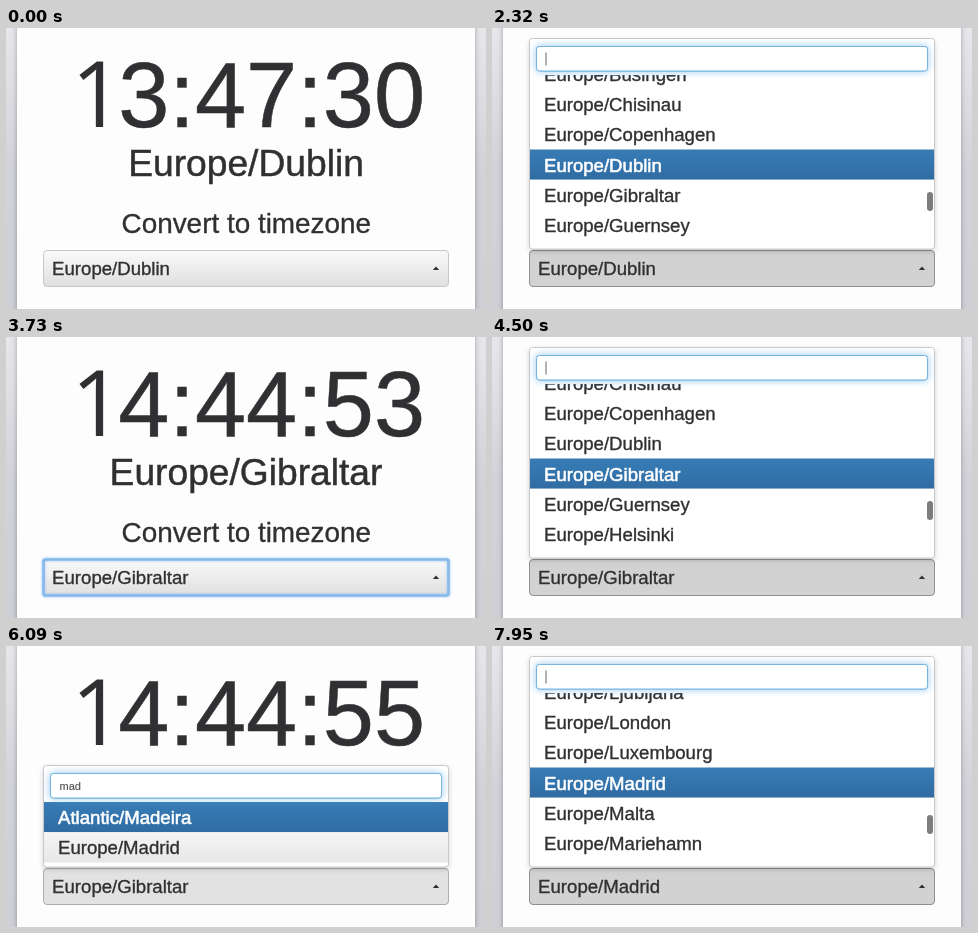
Write an HTML page with a canvas that moves like this. It is 480x281 px and loops after 8 s.

```html
<!DOCTYPE html>
<html lang="en">
<head>
<meta charset="utf-8">
<title>Timezone clock</title>
<style>
html, body { margin: 0; width: 100%; height: 100%; overflow: hidden; background: #fff; }
canvas { display: block; width: 480px; height: 281px; }
</style>
</head>
<body>
<canvas width="480" height="281"></canvas>
<script>
const ctx = document.querySelector('canvas').getContext('2d');
const LOOP = 8000, ROW = 30.25, INK = '#303033';
const SANS = '"Liberation Sans", Arial, sans-serif';

const zones = {
  Dublin: ['Busingen', 'Chisinau', 'Copenhagen', 'Dublin', 'Gibraltar', 'Guernsey', 'Helsinki'],
  Gibraltar: ['Chisinau', 'Copenhagen', 'Dublin', 'Gibraltar', 'Guernsey', 'Helsinki', 'Isle_of_Man'],
  Madrid: ['Ljubljana', 'London', 'Luxembourg', 'Madrid', 'Malta', 'Mariehamn', 'Minsk']
};
const matches = {
  m: ['Africa/Asmara', 'Africa/Bamako', 'Africa/Bujumbura', 'Africa/Dar_es_Salaam', 'Africa/Khartoum', 'Africa/Lome'],
  ma: ['Africa/Asmara', 'Africa/Bamako', 'Africa/Maputo', 'Africa/Maseru', 'America/Managua', 'America/Manaus'],
  mad: ['Atlantic/Madeira', 'Europe/Madrid']
};

// Last value whose start time has passed
const at = (t, steps) => steps.filter(s => s[0] <= t).pop()[1];

// The thin outline gives the text a slightly stronger weight
function text(str, x, y, size, { color = INK, align = 'left', weight = .35, family = SANS } = {}) {
  ctx.font = `${size}px ${family}`;
  ctx.textAlign = align;
  ctx.fillStyle = ctx.strokeStyle = color;
  ctx.lineWidth = weight;
  ctx.lineJoin = 'round';
  ctx.fillText(str, x, y);
  if (weight) ctx.strokeText(str, x, y);
}

function box(x, y, w, h, r, fill, stroke, line = 1) {
  ctx.beginPath();
  ctx.roundRect(x, y, w, h, r);
  if (fill) { ctx.fillStyle = fill; ctx.fill(); }
  if (stroke) { ctx.strokeStyle = stroke; ctx.lineWidth = line; ctx.stroke(); }
}

function shade(y0, y1, ...colors) {
  const g = ctx.createLinearGradient(0, y0, 0, y1);
  colors.forEach((c, i) => g.addColorStop(i / (colors.length - 1), c));
  return g;
}

function shadow(color, blur, dy, draw) {
  ctx.save();
  ctx.shadowColor = color;
  ctx.shadowBlur = blur;
  ctx.shadowOffsetY = dy;
  draw();
  ctx.restore();
}

function clock(t) {
  const [base, sec] = t < 3550 ? ['13:47:', 30 + Math.floor((t + 550) / 1000)]
    : ['14:44:', 53 + Math.floor((t - (t < 6410 ? 3550 : 6410)) / 1000)];
  const size = 92;
  let x = 61;
  for (const ch of base + sec) {
    // A one without a foot
    if (ch === '1') text(ch, x + 4, 99, size, { family: '"Open Sans", sans-serif', weight: 0 });
    else text(ch, x, 99, size, { weight: .5 });
    x += size * (ch === ':' ? .278 : .556);
  }
}

function page(t, zone) {
  ctx.fillStyle = shade(0, 281, '#e7e7eb', '#d2d2d9', '#cfcfd6');
  ctx.fillRect(0, 0, 480, 281);
  shadow('rgba(0,0,0,.3)', 5, 0, () => box(11, -20, 458, 330, 0, '#fefdfe'));
  clock(t);
  text('Europe/' + zone, 240, 148, 37.2, { align: 'center', weight: .5 });
  text('Convert to timezone', 240.3, 205, 27.9, { align: 'center' });
}

function button(zone, state) {
  const looks = {
    normal: [shade(222, 259, '#fafafa', '#dfdfdf'), '#c8c8c8'],
    hover: [shade(222, 259, '#f1f1f1', '#e0e0e0', '#e0e0e0'), '#adadad'],
    open: ['#e2e2e2', '#adadad'],
    pressed: ['#d2d2d2', '#8f8f8f']
  };
  const [look, ring] = state;
  box(37.5, 222.5, 405, 36, 3.5, ...looks[look]);
  if (ring) shadow('#8fc0f0', 3, 0, () => box(37.5, 222.5, 405, 36, 2, null, '#86b9ea', 2.5));
  text('Europe/' + zone, 46.1, 247, 18.6);
  ctx.beginPath();
  ctx.moveTo(426.8, 242);
  ctx.lineTo(433.2, 242);
  ctx.lineTo(430, 238.6);
  ctx.fill();
}

function menu(t, zone, opened, query, hover) {
  const found = matches[query];
  const rows = found || zones[zone].map(z => 'Europe/' + z);
  const top = query === 'mad' ? 120 : 11;
  const first = found ? top + 36 : 121.5 - 3 * ROW;
  const active = found ? 0 : 3;

  shadow('rgba(0,0,0,.2)', 5, 2, () => box(37.5, top - .5, 405, 221.5 - top, 3, '#fff'));
  box(37.5, top - .5, 405, 221.5 - top, 3, '#fff', '#c9c9c9');

  ctx.save();
  ctx.beginPath();
  ctx.rect(38, top + 36, 404, 181 - top);
  ctx.clip();
  rows.forEach((name, i) => {
    const y = first + i * ROW, on = i === active;
    if (on) ctx.fillStyle = shade(y, y + ROW, '#387cb6', '#2f6ca2');
    else if (i === hover) ctx.fillStyle = shade(y, y + ROW, '#f5f5f5', '#e7e7e7');
    else ctx.fillStyle = '#fff';
    ctx.fillRect(38, y, 404, ROW);
    text(name, 52, y + 22, 18.6, on ? { color: '#fff', weight: .6 } : {});
  });
  ctx.restore();

  shadow('rgba(102,175,233,.65)', 7, 0, () => box(44.5, top + 7.5, 391, 24.5, 3, '#fff', '#75b5e0'));
  box(44.5, top + 7.5, 391, 24.5, 3, '#fff', '#75b5e0');
  text(query, 53.5, top + 23.5, 11, { color: '#555', weight: .2 });
  const typed = found ? 5000 + 90 * (query.length - 1) : opened;
  if ((t - typed) % 1060 < 530) {
    ctx.fillStyle = '#666';
    ctx.fillRect(53.5 + ctx.measureText(query).width, top + 13.5, 1, 13);
  }

  ctx.globalAlpha = found ? 0 : Math.max(0, Math.min(1, (750 - (t - opened)) / 250));
  box(435, zone === 'Madrid' ? 169 : 164, 6, 19, 3, '#7d7d7d');
  ctx.globalAlpha = 1;
}

function frame(now) {
  const t = now % LOOP;
  const zone = at(t, [[0, 'Dublin'], [3550, 'Gibraltar'], [6410, 'Madrid']]);
  const opened = at(t, [[0, 0], [2250, 2250], [3550, 0], [4250, 4250], [6410, 0], [7700, 7700]]);
  const state = at(t, [
    [0, ['normal']], [2050, ['hover']], [2250, ['pressed']], [2600, ['open']],
    [3550, ['normal', true]], [4050, ['hover', true]], [4250, ['pressed']],
    [5950, ['open']], [6410, ['normal', true]], [7100, ['hover', true]], [7700, ['pressed']]
  ]);
  const query = at(t, [[0, ''], [5000, 'm'], [5090, 'ma'], [5180, 'mad'], [6410, '']]);
  const hover = at(t, [[0, -1], [2650, 5], [3250, 4], [3550, -1], [6000, 1], [6410, -1]]);
  page(t, zone);
  button(zone, state);
  if (opened) menu(t, zone, opened, query, hover);
  requestAnimationFrame(frame);
}
requestAnimationFrame(frame);
</script>
</body>
</html>
```
